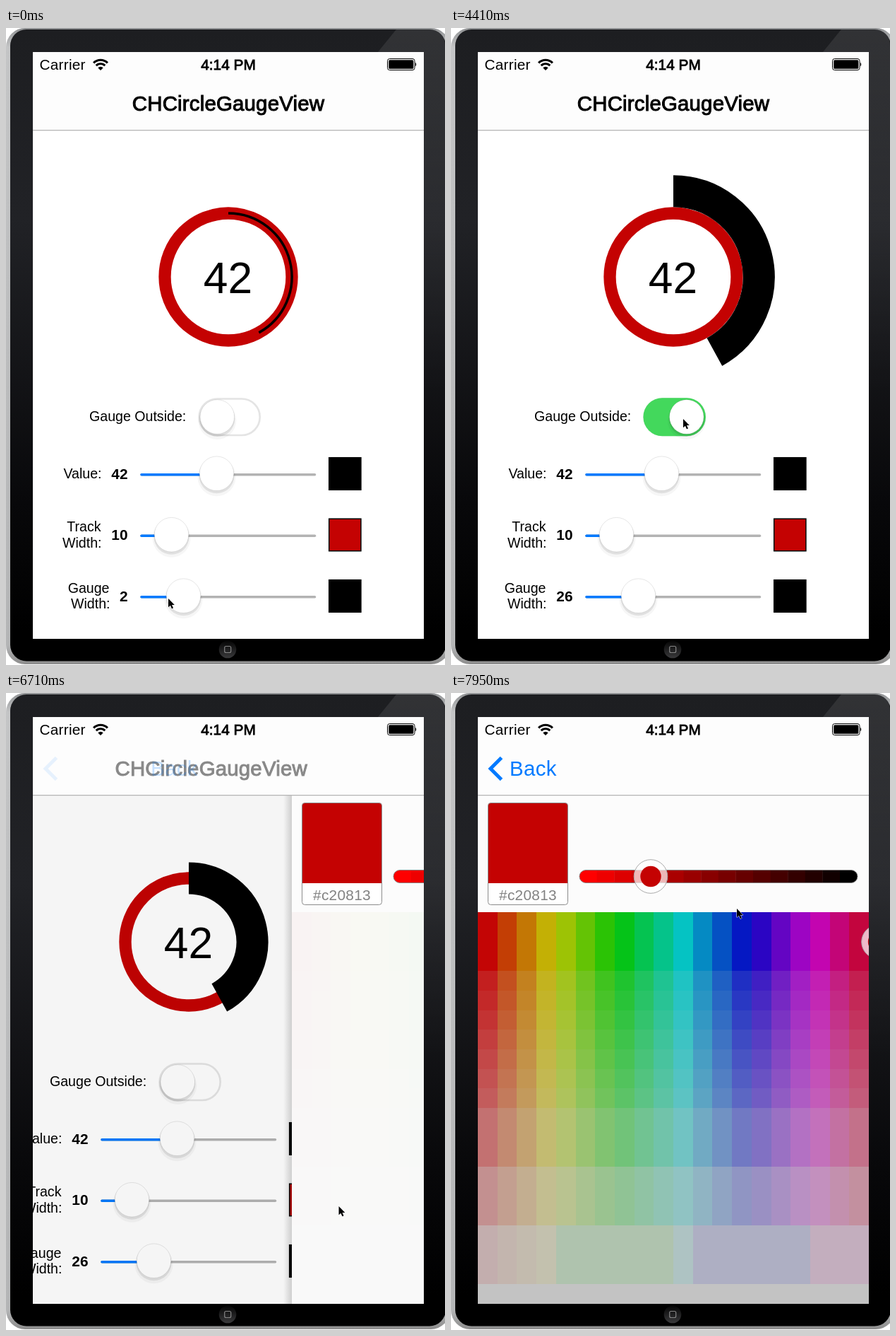
Animation, 622 px wide and 901 px high, one loop 8 s. Source, as an HTML page:

```html
<!DOCTYPE html>
<html lang="en">
<head>
<meta charset="utf-8">
<title>Circle gauge demo</title>
<style>
  html, body { margin: 0; width: 100%; height: 100%; overflow: hidden; background: #fff; }
  svg { display: block; width: 622px; height: 901px; }
  text { font: 19.6px "Liberation Sans", Arial, sans-serif; white-space: pre; }
  .small { font-size: 20.8px; }
  .nav { font-size: 29.4px; }
  .medium { stroke: #000; stroke-width: .8; }
  .end { text-anchor: end; }
  .mid { text-anchor: middle; }
  .num { font-size: 20.8px; font-weight: bold; text-anchor: end; }
  .big { font-size: 62.3px; text-anchor: middle; }
</style>
</head>
<body>
<svg viewBox="0 0 622 901">
  <defs>
    <linearGradient id="metal" x2="0" y2="1">
      <stop stop-color="#8f9193"/><stop offset=".03" stop-color="#c4c5c6"/>
      <stop offset=".97" stop-color="#b4b5b6"/><stop offset="1" stop-color="#8c8c8c"/>
    </linearGradient>
    <linearGradient id="bezel" x2="0" y2="1">
      <stop stop-color="#1d1e21"/><stop offset=".3" stop-color="#212226"/>
      <stop offset=".75" stop-color="#08080a"/><stop offset=".95" stop-color="#000"/>
    </linearGradient>
    <linearGradient id="glare" x2="0" y2="1">
      <stop stop-color="#fff" stop-opacity=".09"/><stop offset="1" stop-color="#fff" stop-opacity="0"/>
    </linearGradient>
    <linearGradient id="button" x2="0" y2="1">
      <stop stop-color="#050505"/><stop offset="1" stop-color="#3a3a3c"/>
    </linearGradient>
    <linearGradient id="edge">
      <stop stop-color="#000" stop-opacity="0"/><stop offset="1" stop-color="#000" stop-opacity=".16"/>
    </linearGradient>
    <clipPath id="screen"><rect x="38" y="34" width="554" height="830"/></clipPath>
    <clipPath id="bar"><rect x="182" y="250.5" width="394" height="18" rx="9"/></clipPath>
    <clipPath id="chip"><rect x="52.5" y="155.5" width="113" height="144" rx="4"/></clipPath>
  </defs>

  <rect x="0" y="0" width="629" height="900" rx="27" fill="url(#metal)"/>
  <rect x="6" y="2" width="617" height="893.5" rx="23" fill="url(#bezel)"/>
  <path d="M553 2H600Q622 4 622 26V520H592V34H527Z" fill="url(#glare)"/>
  <circle cx="314" cy="879" r="12.3" fill="url(#button)"/>
  <rect x="309.7" y="874.5" width="9" height="9" rx="2" fill="none" stroke="#858585" stroke-width="1.2"/>

  <g clip-path="url(#screen)">
    <g id="home"></g>
    <rect id="dim" x="38" y="34" width="554" height="830"/>
    <g id="picker"></g>
    <rect x="38" y="34" width="554" height="110.5" fill="#fdfdfd"/>
    <path d="M38 144.7H592" stroke="#b4b4b4" stroke-width="1.2"/>
    <text id="title" class="nav medium mid" x="315" y="117" letter-spacing=".2" style="stroke-width:1">CHCircleGaugeView</text>
    <path id="chevron" d="M71.5 91.500L56 107L71.500 122.500" fill="none" stroke="#007aff" stroke-width="5"/>
    <text id="back" class="nav" x="83" y="117" letter-spacing=".4" fill="#007aff">Back</text>
    <text class="small" x="47.500" y="59" letter-spacing=".25">Carrier</text>
    <text class="small medium mid" x="315" y="59">4:14 PM</text>
    <g fill="none" stroke="#000" stroke-width="3.1">
      <path d="M124.100 49.300A14 14 0 0 1 143.900 49.300M127.700 53.100A8.900 8.900 0 0 1 140.300 53.100"/>
    </g>
    <path d="M134 60L130.300 56.200A5.200 5.200 0 0 1 137.700 56.200Z"/>
    <rect x="540.500" y="43.500" width="38.500" height="16" rx="3" fill="none" stroke="#000" stroke-width="1"/>
    <rect x="542.200" y="45.200" width="35.100" height="12.600" rx="1.500"/>
    <path d="M580 48.500Q582.500 51.500 580 54.500Z"/>
  </g>

  <path id="cursor" d="M0 0V12.300L2.900 9.700L4.900 14.300L7 13.400L5 9H8.800Z" stroke="#fff" stroke-width="1" paint-order="stroke"/>
</svg>

<script>
const $ = id => document.getElementById(id);
const set = (id, attrs) => { for (const k in attrs) $(id).setAttribute(k, attrs[k]); };
const RED = '#c40202', BLUE = '#007aff', CX = 315, CY = 352, PT = 554 / 320;

// ---- markup ----
const knob = (id, x, y, half = 24.5) => {
  const disc = (r, dy, extra) =>
    `<rect x="${-half - r + 24.5}" y="${-r + dy}" width="${2 * (half + r - 24.5)}" height="${2 * r}" rx="${r}" ${extra}/>`;
  return `<g id="${id}" transform="translate(${x} ${y})">` +
    disc(27, 5, 'fill-opacity=".035"') + disc(25, 3, 'fill-opacity=".09"') +
    disc(24.3, 0, 'fill="#fff" stroke="#000" stroke-opacity=".13" stroke-width=".8"') + '</g>';
};

const slider = (id, y, value) => {
  const x = 214.5 + value * 2;
  return `<g fill="none" stroke-width="3.5" stroke-linecap="round">
    <path d="M192 ${y}H437.500" stroke="#b3b3b3"/><path id="${id}Fill" d="M192 ${y}H${x}" stroke="${BLUE}"/></g>` +
    knob(id, x, y - 1.5);
};

const swatch = (y, color) =>
  `<rect x="457.700" y="${y}" width="45.200" height="45.500" fill="${color}" stroke="#000" stroke-width="1.500"/>`;

$('home').innerHTML = `
  <rect x="38" y="34" width="720" height="830" fill="#fff"/>
  <circle cx="${CX}" cy="${CY}" r="90" fill="none" stroke="${RED}" stroke-width="${10 * PT}"/>
  <path id="gauge" fill="none" stroke="#000"/>
  <text class="big" x="314.500" y="375">42</text>
  <text x="118" y="556">Gauge Outside:</text>
  <rect x="273.700" y="524.500" width="86" height="51.500" rx="25.700" fill="#fff" stroke="#e4e4e4" stroke-width="2.600"/>
  <rect id="green" x="272.400" y="523.200" width="88.500" height="54" rx="27" fill="#43d85c"/>
  <g id="toggle"></g>
  <text class="end" x="135.500" y="637">Value:</text>
  <text class="num" x="172.500" y="637.500">42</text>
  <text class="end" x="134.500" y="712">Track</text>
  <text class="end" x="135.500" y="734.500">Width:</text>
  <text class="num" x="172.500" y="724">10</text>
  <g id="gaugeLabel">
    <text class="end" x="134.500" y="798.500">Gauge</text>
    <text class="end" x="135.500" y="821">Width:</text>
  </g>
  <text id="gaugeNum" class="num" x="172.500" y="810.500"></text>
  ${slider('value', 631.7, 42)}${slider('track', 718.2, 10)}${slider('width', 804.7, 25.5)}
  ${swatch(607.7, '#000')}${swatch(694.2, RED)}${swatch(780.7, '#000')}`;

// hsv with value fixed at .765, as an rgb() string
const hsv = (h, s) => {
  const ch = n => {
    const k = (n + h * 6) % 6;
    return Math.round(195 * (1 - s * Math.max(0, Math.min(k, 4 - k, 1))));
  };
  return `rgb(${ch(5)},${ch(3)},${ch(1)})`;
};

// coarse bands: pale rows share saturation, palest rows share hue too
const bandRow = r => r < 3 ? .5 : r < 10 || r > 18 ? r : r < 13 ? 11 : r < 16 ? 14 : 17;
const bandCol = (c, r) => r < 16 || c < 4 || c === 10 ? c : c < 10 ? 6.6 : c < 17 ? 13.3 : 17.5;

let cells = '';
const size = 554 / 20;
for (let r = 0; r < 20; r++) for (let c = 0; c < 20; c++)
  cells += `<rect x="${38 + c * size}" y="${310 + r * size}" width="${size + .4}" height="${size + .4}" ` +
    `fill="${hsv(bandCol(c, r) / 20, 1 - bandRow(r) / 19)}"/>`;

let shades = '';
for (let i = 0; i < 16; i++)
  shades += `<rect x="${182 + i * 24.6}" y="250" width="25" height="19" fill="rgb(${255 - i * 17},0,0)"/>`;

const loupe = (x, y) =>
  `<circle cx="${x}" cy="${y}" r="23.800" fill="#fff" fill-opacity=".72" stroke="#aaa" stroke-width="1"/>
   <circle cx="${x}" cy="${y}" r="14.700" fill="${RED}"/>`;

$('picker').innerHTML = `
  <rect x="26" y="145" width="12" height="719" fill="url(#edge)"/>
  <rect x="38" y="34" width="554" height="830" fill="#fcfcfc"/>
  <g id="palette" shape-rendering="crispEdges">${cells}</g>
  <g id="mark">${loupe(605.5, 352)}</g>
  <g clip-path="url(#chip)"><rect x="52" y="155" width="115" height="145" fill="#fff"/>
    <rect x="52" y="155" width="115" height="114" fill="${RED}"/></g>
  <rect x="52.500" y="155.500" width="113" height="144" rx="4" fill="none" stroke="#8c8c8c"/>
  <text class="small mid" x="109" y="292.500" letter-spacing=".3" fill="#828282">#c20813</text>
  <g clip-path="url(#bar)">${shades}</g>
  <rect x="182" y="250.500" width="394" height="18" rx="9" fill="none" stroke="#808080" stroke-width=".9"/>
  ${loupe(283, 259.5)}`;

// ---- motion ----
const knobAt = [[0, 251.5], [60, 253.5], [240, 260], [290, 265.5]];
const widthAt = [[0, 2], [470, 18], [550, 21], [630, 24], [710, 26]];
const mapAt = [[0, 0], [6710, .03], [6860, .75], [7030, 1]];
const pushTimes = [6650, 6710, 6860, 7030, 7180];

// pointer moves: start, end, steps, control x, y, end x, y
const moves = [
  [60, 60, 1, 234, 807, 238, 807],
  [240, 290, 2, 246, 807, 254, 807],
  [470, 710, 4, 262, 807, 271, 807],
  [1240, 1660, 8, 262, 775, 244, 730],
  [2020, 2080, 2, 244, 745, 250, 756],
  [2140, 2560, 8, 290, 620, 346, 528],
  [2620, 2800, 4, 335, 540, 302, 558],
  [3450, 3690, 5, 315, 552, 329, 553],
  [5200, 5890, 13, 390, 690, 469, 793],
  [5950, 5950, 1, 470, 794, 470, 794],
  [6010, 6010, 1, 470, 796, 470, 796],
  [6190, 6410, 5, 472, 760, 471.5, 726],
  [6860, 6860, 1, 465, 660, 465, 660],
  [7030, 7030, 1, 451, 538, 451, 538],
  [7180, 7180, 1, 400, 386, 400, 386],
  [7320, 7950, 11, 272, 210, 405, 305]
];

const hold = (table, t) => table.filter(row => row[0] <= t).pop()[1];

// eased progress that jumps n times from t0 to t1
const steps = (t, t0, t1, n) => {
  if (t < t0) return 0;
  const p = Math.min(1, (Math.floor((t - t0) / (t1 - t0 || 1) * (n - 1) + 1e-6) + 1) / n);
  return p * p * (3 - 2 * p);
};

function pointer(t) {
  let x = 230, y = 807;
  for (const [t0, t1, n, cx, cy, ex, ey] of moves) {
    if (t < t0) break;
    const p = steps(t, t0, t1, n), q = 1 - p;
    x = q * q * x + 2 * p * q * cx + p * p * ex;
    y = q * q * y + 2 * p * q * cy + p * p * ey;
  }
  return [x, y];
}

// critically damped spring, sampled at the push times
function push(t) {
  const last = pushTimes.filter(s => s <= t).pop();
  if (!last) return 0;
  if (last === 7180) return 1;
  const a = .105 + (last - 6650) * .01826;
  return 1 - Math.exp(-a) * (1 + a);
}

function drawGauge(width, out) {
  const r = 90 + out * (width + 10) * PT / 2, a = .42 * 2 * Math.PI;
  set('gauge', {
    d: `M${CX} ${CY - r}A${r} ${r} 0 0 1 ${CX + r * Math.sin(a)} ${CY - r * Math.cos(a)}`,
    'stroke-width': width * PT
  });
}

function draw(t) {
  const out = steps(t, 2920, 3270, 6) - steps(t, 4470, 4910, 8);
  const width = hold(widthAt, t), kx = hold(knobAt, t);
  drawGauge(width, out);
  set('green', { opacity: out });
  const pressed = (t >= 2860 && t < 3150) || (t >= 4470 && t < 4750);
  const extra = pressed ? 4 : 0;
  $('toggle').innerHTML = knob('thumb', 299.3 + extra + out * (34.5 - 2 * extra), 550, 24.5 + extra);

  $('gaugeNum').textContent = width;
  set('gaugeLabel', { transform: `translate(${width < 10 ? 12 : 0} 0)` });
  set('width', { transform: `translate(${kx} 803.2)` });
  set('widthFill', { d: `M192 804.7H${kx}` });

  const p = push(t);
  set('home', { transform: `translate(${-166 * p} 0)` });
  set('dim', { opacity: .115 * p });
  set('picker', { transform: `translate(${554 * (1 - p)} 0)`, visibility: p ? 'visible' : 'hidden' });
  set('palette', { opacity: hold(mapAt, t) });
  set('mark', { opacity: hold(mapAt, t) });
  set('title', { transform: `translate(${-72 * p} 0)`, opacity: Math.max(0, 1 - 1.6 * p) });
  set('back', { transform: `translate(${184 * (1 - p)} 0)`, opacity: p ** 1.4 });
  set('chevron', { opacity: p ** 2.2 });
  set('cursor', { transform: `translate(${pointer(t)})` });
}

const start = performance.now();
function tick() {
  draw((performance.now() - start) % 8000);
  requestAnimationFrame(tick);
}
tick();
</script>
</body>
</html>
```
